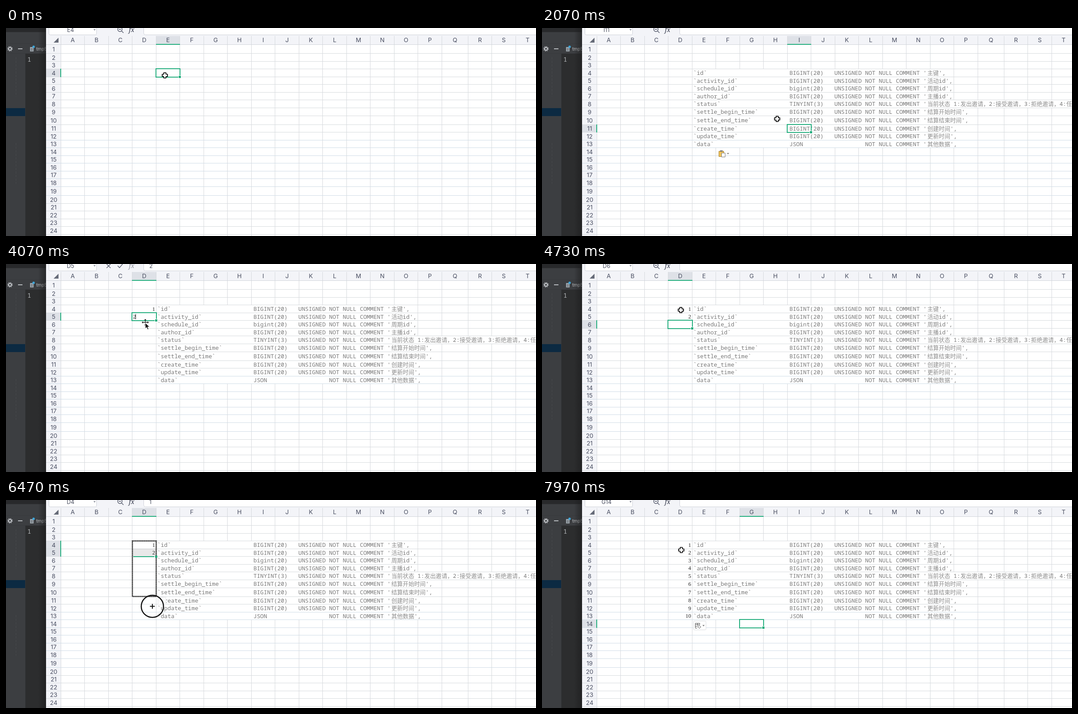
Write an HTML page that moves like this. It is 1191x470 px and loops after 8000 ms.

```html
<!DOCTYPE html>
<html lang="zh">
<head>
<meta charset="utf-8">
<title>Sheet fill series</title>
<style>
  html, body { margin: 0; width: 100%; height: 100%; overflow: hidden; background: #fff; }
  svg { display: block; width: 1191px; height: 470px; }
  text { white-space: pre; }
  .label { font: 13.5px Inter, "Open Sans", sans-serif; fill: #4a4f62; text-anchor: middle; }
  .ui { font: 12.5px Inter, "Open Sans", sans-serif; fill: #464b5c; }
  .mono { font: 12.8px "Noto Sans Mono", "DejaVu Sans Mono", monospace; fill: #7a7a7a; }
  .cjk { font: 300 12.8px "Noto Sans CJK SC", "Noto Sans CJK", sans-serif; fill: #8c8c8c; }
  .num { font: 12.5px "Liberation Serif", "Noto Serif", serif; fill: #222; }
  .line { fill: none; stroke: #4b5063; stroke-width: 1.3; }
</style>
</head>
<body>
<svg viewBox="0 0 1191 470">
  <defs>
    <linearGradient id="shade">
      <stop offset="0" stop-color="#1a1a1b" stop-opacity="0"/>
      <stop offset="1" stop-color="#1a1a1b" stop-opacity=".6"/>
    </linearGradient>
  </defs>

  <!-- editor behind -->
  <rect width="90" height="470" fill="#3c3e41"/>
  <rect width="90" height="9" fill="#28292b"/>
  <path d="M0 9.5H90M0 35.5H90M0 57.5H90" stroke="#37393c"/>
  <rect x="44" y="58" width="46" height="412" fill="#2c2d2e"/>
  <rect y="181" width="43" height="18" fill="#0c2a42"/>
  <path d="M43.5 58V470" stroke="#333537"/>
  <path d="M22.5 66V155M22.5 260V352" stroke="#47494c" stroke-dasharray="5 3"/>
  <g fill="none" stroke="#b9bcc0">
    <circle cx="9" cy="47" r="3.2" stroke-width="2.2"/>
    <circle cx="9" cy="47" r="5" stroke-width="1.8" stroke-dasharray="2 1.93"/>
    <path d="M27 47H37" stroke-width="2"/>
  </g>
  <path d="M54 43h8v10h-8z" fill="#9aa3aa"/>
  <path d="M56 47h4M56 50h4" stroke="#45494d"/>
  <circle cx="62" cy="42.5" r="2.7" fill="#3fa5d8"/>
  <text x="68" y="50.5" style="font:10px Inter,sans-serif" fill="#c0c3c6">tmp5</text>
  <text x="48" y="76.3" style="font:14px 'Noto Sans Mono',monospace" fill="#b5b8bb">1</text>
  <rect x="72" width="18" height="470" fill="url(#shade)"/>

  <!-- sheet -->
  <rect x="90" width="1101" height="470" fill="#fff"/>
  <rect x="90" width="1101" height="38" fill="#f3f4f8"/>
  <rect x="90" y="38" width="33" height="432" fill="#f3f4f8"/>
  <rect x="96.5" y="-8" width="107" height="23.5" rx="3" fill="#fff" stroke="#cdd0d8"/>
  <path d="M196.5 2.5h5l-2.5 3.5z" fill="#8a8f9c"/>
  <rect x="309.5" y="-8" width="900" height="23.5" rx="4" fill="#fff" stroke="#cdd0d8"/>
  <text id="name" class="ui" x="145" y="9" text-anchor="middle"></text>
  <text id="formula" class="ui" x="322" y="8.5"></text>
  <g id="zoom" class="line"><circle cx="256" cy="3" r="5"/><path d="M253.5 3h5M259.5 6.500l4.500 4.500"/></g>
  <g id="confirm" class="line"><path d="M226 0l9 9M235 0l-9 9M251 4l4 4.500 7-8.500"/></g>
  <text id="fx" x="276" y="9" style="font:italic 14.5px 'Noto Serif','Liberation Serif',serif" fill="#33384a">fx</text>
  <path d="M118 22V33H107z" fill="#666b78"/>

  <g id="grid"></g>
  <g id="heads"></g>
  <g id="covers"></g>
  <g id="shadeCells" fill="#000" fill-opacity=".09"></g>
  <g id="labels"></g>
  <g id="data"></g>
  <g id="nums" class="num"></g>

  <g id="paste">
    <path d="M397.500 278.500h11v12h-11z" fill="#f0c45c" stroke="#a8802f"/>
    <path d="M400 276.500h6v3h-6z" fill="#777"/>
    <path d="M403.500 282.500h8v9h-8z" fill="#fff" stroke="#777"/>
    <path d="M415.500 282.500h5l-2.500 3z" fill="#777"/>
  </g>
  <g id="fillIcon">
    <rect x="340.500" y="273.500" width="28" height="20" rx="2" fill="#fff" stroke="#dadcdf"/>
    <path d="M344.500 278.500h10v3h-10zM344.500 281.500v8h4M344.500 285.500h4M349.500 278.500v6" fill="none" stroke="#555"/>
    <path d="M353 283l4 4-3 3-4-3z" fill="#fff" stroke="#555"/>
    <path d="M360.500 282.500h5l-2.500 3z" fill="#777"/>
  </g>

  <rect id="box" fill="none" stroke="#22ad7d" stroke-width="2"/>
  <rect id="handle" width="6" height="6" fill="#22ad7d" stroke="#fff"/>
  <g id="edit"><text id="typed" class="num"></text><path id="caret" stroke="#222"/></g>
  <g id="drag">
    <rect id="span" fill="none" stroke="#aaa" stroke-width="2.500"/>
    <rect id="dots" fill="none" stroke="#1c1c1c" stroke-width="2.500" stroke-dasharray="1.500 1"/>
    <path d="M286 128H333" stroke="#22ad7d" stroke-width="2"/>
    <path d="M335 125.500h5v5h-5z" fill="#22ad7d"/>
    <rect id="tip" x="341.500" width="18" height="17" rx="2" fill="#fcfcfc" stroke="#e2e3e5"/>
  </g>

  <g id="mouse">
    <circle id="ring" r="25" fill="none" stroke="#111" stroke-width="2.500"/>
    <path id="cross" d="M-2.500-6h5v3.500h3.500v5h-3.500v3.500h-5v-3.500h-3.500v-5h3.500z" fill="#fff" stroke="#000" stroke-width="1.700" stroke-linejoin="round"/>
    <path id="plus" d="M-5.500 0h11M0-5.500v11" stroke="#111" stroke-width="2"/>
    <g id="move">
      <path d="M-6 0H6M0-6V6" stroke="#222" stroke-width="1.300"/>
      <path d="M0-8l2.500 3h-5zM0 8l2.500-3h-5zM-8 0l3-2.500v5zM8 0l-3-2.500v5z" fill="#222"/>
      <path d="M0 1v13l3-2.800 2.300 5 2.300-1-2.200-5h4.300z" fill="#111" stroke="#fff"/>
    </g>
  </g>
</svg>
<script>
const LOOP = 8000, NS = 'http://www.w3.org/2000/svg';
const $ = id => document.getElementById(id);
const X = [123, 176, 230, 283, 337, 390, 444, 497, 551, 604, 658, 711, 765, 818, 872, 925, 979, 1038, 1091, 1145, 1198];
const Y = [38, 57, 75, 92, 110, 127, 145, 162, 180, 198, 218, 235, 253, 270, 288, 305, 323, 340, 358, 378, 396, 413, 431, 448, 466];
const mid = r => (Y[r - 1] + Y[r]) / 2;
const letter = c => String.fromCharCode(65 + c);

function add(parent, tag, attrs, text) {
  const el = document.createElementNS(NS, tag);
  for (const k in attrs) el.setAttribute(k, attrs[k]);
  if (text !== undefined) el.textContent = text;
  parent.appendChild(el);
  return el;
}
const set = (el, attrs) => { for (const k in attrs) el.setAttribute(k, attrs[k]); };
const show = (el, on) => { el.style.display = on ? '' : 'none'; };
const block = (g, x, y, w, h, fill) => add(g, 'rect', { x, y, width: w, height: h, ...(fill && { fill }) });

// Column and row headings, with a highlight for each
const colMarks = [], rowMarks = [];
function mark(x, y, w, h, edge) {
  const g = add($('heads'), 'g', {});
  block(g, x, y, w, h, '#dee1e7');
  block(g, ...edge, '#22ad7d');
  return g;
}
for (let c = 0; c < 20; c++) {
  const w = X[c + 1] - X[c];
  colMarks.push(mark(X[c] + 1, 18, w - 1, 20, [X[c], 36, w + 1, 2]));
  block($('grid'), X[c], 18, 1, 452, '#d6d9dd');
  add($('labels'), 'text', { class: 'label', x: X[c] + w / 2 + .5, y: 32.4 }, letter(c));
}
for (let r = 1; r <= 24; r++) {
  const h = Y[r] - Y[r - 1];
  rowMarks.push(mark(90, Y[r - 1] + 1, 33, h - 1, [122, Y[r - 1], 2, h + 1]));
  block($('grid'), 90, Y[r], 1101, 1, r > 11 && r < 20 ? '#cfdce6' : '#d6dadd');
  add($('labels'), 'text', { class: 'label', x: 107, y: mid(r) + 5.6 }, r);
}
block($('grid'), 90, 37, 1101, 1, '#d0d4da');

// Pasted rows: field, type, comment, right edge of the overflow
const big = 'BIGINT(20)';
const fields = [
  ['id', big, '主键', 925], ['activity_id', big, '活动id', 925],
  ['schedule_id', 'bigint(20)', '周期id', 925], ['author_id', big, '主播id', 925],
  ['status', 'TINYINT(3)', '当前状态 1:发出邀请，2:接受邀请，3:拒绝邀请，4:任务', 1191],
  ['settle_begin_time', big, '结算开始时间', 979], ['settle_end_time', big, '结算结束时间', 979],
  ['create_time', big, '创建时间', 979], ['update_time', big, '更新时间', 979],
  ['data', 'JSON', '其他数据', 979]
];
const nums = [];
fields.forEach(([name, type, note, end], i) => {
  const r = i + 4, y = mid(r) + 5.3, put = (x, s) => add($('data'), 'text', { class: 'mono', x, y }, s);
  block($('covers'), 338, Y[r - 1] + 1, end - 338, Y[r] - Y[r - 1] - 1, '#fff');
  put(340, '`' + name + '`');
  put(556, type);
  put(type === 'JSON' ? 726 : 657, (type === 'JSON' ? '' : 'UNSIGNED ') + "NOT NULL COMMENT '");
  const line = put(866, '');
  (note + "',").match(/[\u3000-\uffff]+|[^\u3000-\uffff]+/g).forEach(s =>
    add(line, 'tspan', s[0] > '\u3000' ? { class: 'cjk' } : {}, s));
  nums.push(add($('nums'), 'text', { x: 335, y: y - .5, 'text-anchor': 'end' }, i + 1));
});

const pasted = '`id`' + ' '.repeat(24) + "BIGINT(20)   UNSIGNED NOT NULL COMMENT '主键',";
// time, column, first row, last row, formula, typed text
const picks = [
  [0, 4, 4, 4, ''], [1030, 4, 4, 13, pasted], [1830, 8, 11, 11, ''],
  [2600, 3, 4, 4, ''], [3330, 3, 4, 4, '1', '1'], [3630, 3, 5, 5, ''],
  [3900, 3, 5, 5, '2', '2'], [4170, 3, 6, 6, ''], [5000, 3, 4, 4, '1'],
  [5170, 3, 4, 5, '1'], [6750, 3, 4, 13, '1'], [7230, 6, 14, 14, '']
];
// Mouse: start, end, target
const moves = [
  [30, 370, 374, 106], [1430, 1800, 578, 228], [1900, 2520, 312, 106],
  [2760, 3070, 313, 132], [4200, 4800, 312, 103], [5060, 5230, 313, 118],
  [5300, 5580, 338, 129], [6150, 6588, 327, 264], [6860, 7190, 471, 280],
  [7330, 7970, 313, 113]
];
const presses = [[1820, 1890], [2590, 2690], [5000, 5270], [6030, 6750], [7210, 7310]];
const within = (t, a, b) => t >= a && t < b;

function mouseAt(t) {
  let x = 357, y = 107;
  for (const [a, b, tx, ty] of moves) {
    const u = Math.min(1, Math.max(0, (t - a) / (b - a))), s = u * u * (3 - 2 * u);
    x += (tx - x) * s;
    y += (ty - y) * s;
  }
  return [x, y];
}

let last = null;
function select(p) {
  if (p === last) return;
  last = p;
  const [, c, r1, r2, formula, typed] = p;
  const x = X[c], y = Y[r1 - 1], w = X[c + 1] - x + 1, h = Y[r2] - y + 1;
  colMarks.forEach((g, i) => show(g, i === c));
  rowMarks.forEach((g, i) => show(g, i + 1 >= r1 && i + 1 <= r2));
  set($('box'), { x, y, width: w, height: h });
  set($('handle'), { x: x + w - 3.5, y: y + h - 3.5 });
  $('shadeCells').textContent = '';
  if (r2 > r1) block($('shadeCells'), x, Y[r1], w, Y[r2] - Y[r1]);
  $('name').textContent = letter(c) + r1;
  $('formula').textContent = formula;
  show($('edit'), typed);
  show($('confirm'), typed);
  show($('zoom'), !typed);
  $('fx').setAttribute('opacity', typed ? .5 : 1);
  if (typed) {
    $('typed').textContent = typed;
    set($('typed'), { x: x + 2.5, y: y + 13 });
    $('caret').setAttribute('d', `M${x + 8.5} ${y + 3}v12`);
  }
}

function draw(t) {
  select(picks.filter(p => p[0] <= t).pop());
  show($('data'), t >= 1030);
  show($('covers'), t >= 1030);
  show($('paste'), within(t, 1030, 3330));
  show($('fillIcon'), t >= 6780);
  nums.forEach((n, i) => show(n, t >= [3630, 4170][i] || t >= 6750));

  const [x, y] = mouseAt(t), dragging = within(t, 6150, 6750);
  show($('drag'), dragging);
  show($('box'), !dragging);
  show($('handle'), !dragging);
  if (dragging) {
    const ly = mouseAt(t - 80)[1];
    const r = Math.max(5, Y.findIndex(v => v > ly));
    const area = { x: 284, y: 92.5, width: 53.5, height: Y[r] - 92.5 };
    set($('span'), area);
    set($('dots'), area);
    $('tip').setAttribute('y', Y[r] + 1.5);
  }

  const fill = within(t, 5520, 6850), move = within(t, 3630, 4260);
  $('mouse').setAttribute('transform', `translate(${x.toFixed(2)} ${y.toFixed(2)})`);
  show($('ring'), presses.some(([a, b]) => within(t, a, b)));
  show($('plus'), fill);
  show($('move'), move);
  show($('cross'), !fill && !move);
}

const start = performance.now();
function tick() {
  draw((performance.now() - start) % LOOP);
  requestAnimationFrame(tick);
}
tick();
</script>
</body>
</html>
```
